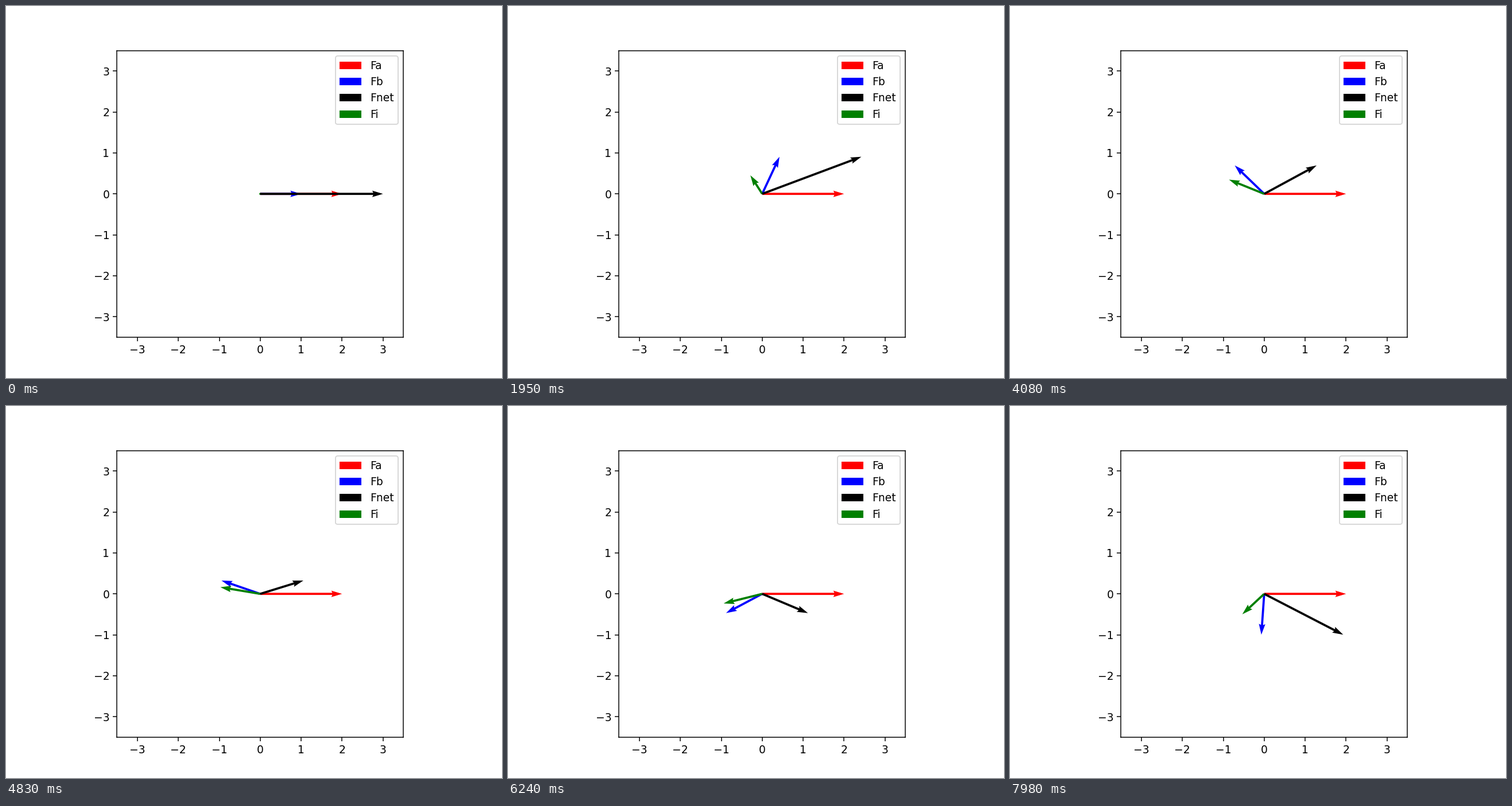
These frames come from a looping animation (864x648 px, 8 s). A matplotlib script:

```python
import numpy as np
import matplotlib.pyplot as plt
from matplotlib.animation import FuncAnimation

LOOP_MS = 8000
TICK_MS = 20      # time between drawn frames
DEGREE_MS = 30    # time per one-degree turn of Fb

plt.rcParams["font.family"] = "DejaVu Sans"
fig, ax = plt.subplots(figsize=(6.4, 4.8), dpi=135)
ax.set_aspect("equal")
ax.set_xlim(-3.5, 3.5)
ax.set_ylim(-3.5, 3.5)
ax.set_xticks(range(-3, 4))
ax.set_yticks(range(-3, 4))


def arrow(u, v, color, label, zorder):
    return ax.quiver(0, 0, u, v, color=color, label=label, zorder=zorder,
                     angles="xy", scale_units="xy", scale=1)


fa = arrow(2, 0, "red", "Fa", 2.1)
fb = arrow(1, 0, "blue", "Fb", 2.2)
fnet = arrow(3, 0, "black", "Fnet", 2.4)
fi = arrow(0, 0, "green", "Fi", 2.3)
ax.legend(loc="upper right")


def update(frame):
    angle = np.radians((frame * TICK_MS + TICK_MS // 2) // DEGREE_MS)
    x, y = np.cos(angle), np.sin(angle)
    fb.set_UVC(x, y)
    fnet.set_UVC(2 + x, y)
    fi.set_UVC((x - 1) / 2, y / 2)
    return fb, fi, fnet


anim = FuncAnimation(fig, update, frames=LOOP_MS // TICK_MS, interval=TICK_MS,
                     init_func=lambda: update(0), repeat=True, repeat_delay=0)
plt.show()
```
